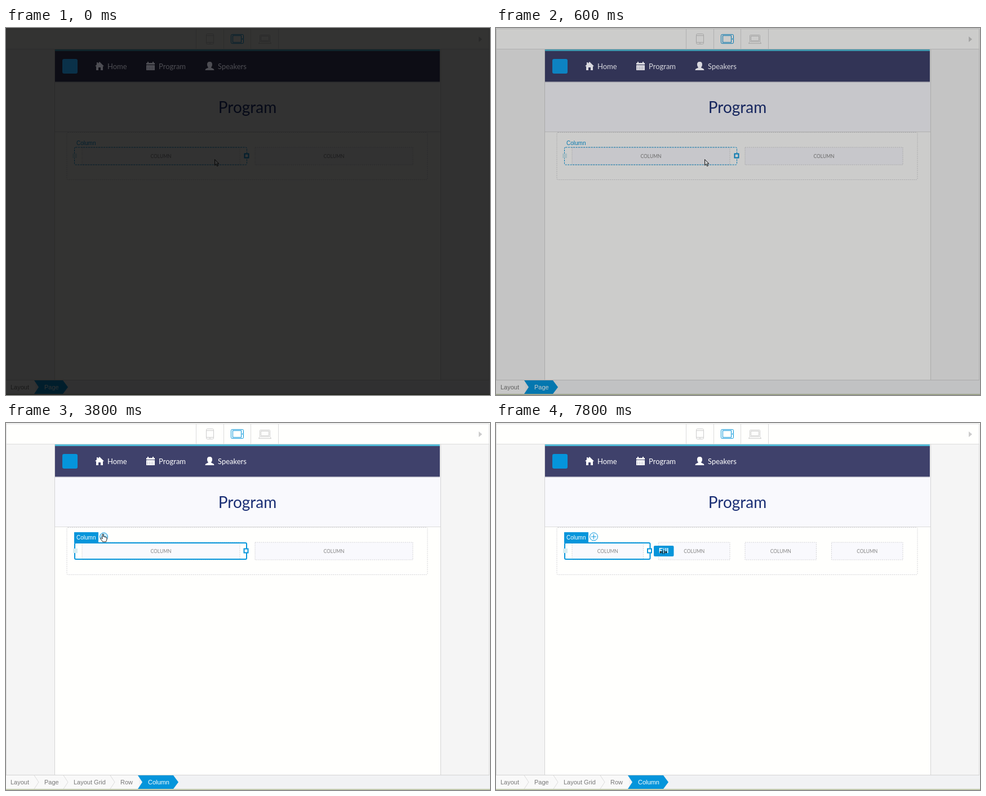
An HTML page that plays this animation: 859 px wide and 652 px high, repeating every 8 s.

```html
<!DOCTYPE html>
<html lang="en">
<head>
<meta charset="utf-8">
<title>Layout grid editor</title>
<style>
html, body { margin: 0; width: 100%; height: 100%; overflow: hidden; background: #fff; }
svg { display: block; width: 100%; height: 100%; }
text { font: 11px "Liberation Sans", Arial, sans-serif; fill: #777; }
.lato text, text.lato { font-family: Lato, sans-serif; }
.nav text { font-size: 13px; }
.line { fill: none; stroke: #dcdcdc; }
.dash { stroke: #d2d2d6; stroke-dasharray: 2 1.5; }
.blue { fill: #0595db; }
.ring { fill: #fff; stroke: #0595db; stroke-width: 2; }
.white, .white text { fill: #fff; }
.cursor { fill: #fff; stroke: #222; stroke-linejoin: round; }
</style>
</head>
<body>
<svg viewBox="0 0 859 652">
  <!-- Editor chrome -->
  <rect width="859" height="652" fill="#f5f5f5"/>
  <rect width="859" height="37" fill="#fffffd"/>
  <path class="line" d="M0 1.5H858M0 37.5H858M.5 1V625M857.5 1V625M337.5 2V37M386.5 2V37M434.5 2V37M483.5 2V37"/>
  <g fill="none" stroke="#ccc">
    <rect x="355.5" y="10.5" width="13" height="18" rx="2"/>
    <path d="M355 13.5H369M355 25.5H369M361 27H363"/>
    <rect x="450.5" y="12.5" width="18" height="12" rx="1"/>
    <rect x="452.5" y="14.5" width="14" height="8"/>
    <path d="M450 24.5L448.5 27.5H470.5L469 24.5"/>
  </g>
  <g fill="none" stroke="#0595db">
    <rect x="399.5" y="11.5" width="22" height="16" rx="2"/>
    <rect x="402.5" y="13.5" width="15" height="12"/>
    <path d="M419.5 18V21"/>
  </g>
  <path d="M839 15V25L845 20Z" fill="#ccc"/>

  <!-- Page -->
  <rect x="87" y="38" width="684" height="587" fill="#fffffd"/>
  <path d="M86.5 38V625M771.5 38V625" stroke="#d4d4d4"/>
  <rect x="87" y="38" width="683" height="3" fill="#50bbd8"/>
  <rect x="87" y="96" width="684" height="88" fill="#f9f9fd"/>
  <path d="M87 96.5H770" stroke="#dcdce4"/>
  <rect x="87" y="41" width="683" height="54.5" fill="#3f416b"/>
  <path class="line" d="M87 184.5H771"/>
  <text class="lato" x="428.5" y="151" text-anchor="middle" style="font-size:28px;fill:#1b2f75">Program</text>
  <rect class="line dash" x="108" y="185.5" width="640" height="84" rx="2"/>
  <g id="columns" class="lato"></g>
  <g id="selection"></g>

  <!-- Breadcrumb -->
  <rect y="625" width="859" height="26" fill="#f1f2f4"/>
  <path d="M0 625.5H858" stroke="#d4d4d4"/>
  <rect y="650" width="859" height="2" fill="#c3cbae"/>
  <g id="crumbs"></g>

  <g id="pointer">
    <path id="arrow" class="cursor" d="M.5.5V11L3 8.7L4.7 12.5L6.5 11.7L4.8 8H8Z"/>
    <path id="hand" class="cursor" d="M-1 1Q0-.5 1 1V5Q2 4 3 5.5Q4 4.7 5 6Q6.5 5.5 7 7V10Q6 12 5.5 14H-.5Q-2 11-4.5 8.5Q-4.5 6.5-2.5 7.5L-1 9Z"/>
    <g id="resize" fill="#222">
      <path d="M-1.5-3V4M1.5-3V4M-6 .5H-2M2 .5H6" stroke="#222"/>
      <path d="M-7 .5L-4-2V3ZM7 .5L4-2V3Z"/>
    </g>
  </g>

  <rect id="dim" width="859" height="652"/>

  <!-- Navigation and active tab stay slightly brighter during the fade -->
  <g id="vivid">
    <rect class="blue" x="100" y="55" width="27" height="26" rx="3"/>
    <g class="white lato nav">
      <path d="M166 60L174 68H172V75H168V70H164V75H160V68H158L161 65V61H163V63Z"/>
      <path d="M249 62H251V60H253V62H260V60H262V62H264V65H249ZM249 66H264V75H249Z"/>
      <path d="M251 69.5H263M251 72.5H263" stroke="#3f416b" stroke-dasharray="1 2"/>
      <path d="M361.5 60C365 60 366 62 366 65C366 67 365 69 364 70C365 72 369 71 369.5 75H353.5C354 71 358 72 359 70C358 69 357 67 357 65C357 62 358 60 361.5 60Z"/>
      <text x="180" y="73">Home</text>
      <text x="271" y="73">Program</text>
      <text x="376" y="73">Speakers</text>
    </g>
  </g>
</svg>
<script>
const LOOP = 8000, STEP = 200;
const SELECT = 1800, THIRD_COLUMN = 4200, FOURTH_COLUMN = 4800, DRAG = 7400;
const ROW_LEFT = 121, ROW_WIDTH = 614;
// Pointer stops: time, x, y
const STOPS = [[0, 370, 233], [1200, 370, 233], [1800, 385, 235], [2400, 385, 235],
  [3600, 172, 197], [4800, 172, 197], [5800, 172, 202], [6200, 172, 202],
  [7200, 272, 227], [7800, 297, 229]];

const el = id => document.getElementById(id);
const show = (id, on) => el(id).setAttribute("display", on ? "inline" : "none");

function pointerAt(t) {
  const i = STOPS.findIndex(s => s[0] > t);
  if (i < 0) return STOPS[STOPS.length - 1].slice(1);
  const [t0, x0, y0] = STOPS[i - 1], [t1, x1, y1] = STOPS[i];
  const p = (t - t0) / (t1 - t0), e = p * p * (3 - 2 * p);
  return [x0 + (x1 - x0) * e, y0 + (y1 - y0) * e];
}

function columns(count) {
  const width = ROW_WIDTH / count;
  return Array.from({ length: count }, (_, i) => {
    const x = ROW_LEFT + i * width + 14;
    return `<rect class="dash" fill="#f9f9fd" x="${x}" y="212" width="${width - 27}" height="31"/>
      <text x="${x + (width - 27) / 2}" y="230.5" text-anchor="middle"
        style="font-size:8.5px;fill:#858585">COLUMN</text>`;
  }).join("");
}

const handle = x => `<rect class="ring" x="${x - 3.5}" y="223.5" width="7" height="7"/>`;
const faintHandle = x => `<rect x="${x - 4}" y="223" width="8" height="8" fill="#d5edf3"/>`;

function selection(count, selected, hover, drag) {
  const width = ROW_WIDTH / count, right = ROW_LEFT + width;
  const label = (y, color) => `<text x="125" y="${y}" style="font-size:10px;fill:${color}">Column</text>`;
  if (!selected) return `<rect x="121.5" y="212" width="${width - 1}" height="31" rx="2"
      fill="none" stroke="#0595db" stroke-dasharray="3 1.5"/>` +
    label(208, "#0595db") + faintHandle(122) + handle(right - 1);
  return `<rect x="122" y="213" width="${width - 2}" height="29" rx="2" fill="none" stroke="#0595db" stroke-width="2"/>
    <rect class="blue" x="121" y="194" width="43" height="19"/>${label(207, "#fff")}
    <circle cx="173.5" cy="202" r="7" fill="${hover ? "#cfeaf6" : "#fff"}" stroke="#0595db"/>
    <path d="M169 202H178M173.5 197.5V206.5" stroke="#0595db"/>
    ${faintHandle(123)}${handle(right - 2)}` +
    (drag ? `<rect class="blue" x="280" y="218" width="35.5" height="19" rx="2"/>
      <text x="289" y="231" style="font-size:12px;font-weight:bold;fill:#fff">Fill</text>` : "");
}

const activeTab = (left, right, textX, name) =>
  `<path class="blue" d="M${left} 626H${right - 9}L${right} 638L${right - 9} 650H${left}L${left + 8} 638Z"/>
   <text class="white" x="${textX}" y="642">${name}</text>`;

function crumbs(selected) {
  const items = selected ? [["Layout", 8], ["Page", 68], ["Layout Grid", 120], ["Row", 203]] : [["Layout", 8]];
  const marks = selected ? [50, 102, 185] : [];
  return `<path d="M0 626H${selected ? 236 : 52}V650H0Z" fill="#f9f9f9"/>` +
    items.map(([name, x]) => `<text x="${x}" y="642">${name}</text>`).join("") +
    marks.map(x => `<path class="line" d="M${x} 626L${x + 8} 638L${x} 650"/>`).join("") +
    (selected ? activeTab(234, 306, 252, "Column") : activeTab(50, 110, 68, "Page"));
}

function draw(t) {
  const selected = t >= SELECT, resizing = t >= 7200;
  const count = t < THIRD_COLUMN ? 2 : t < FOURTH_COLUMN ? 3 : 4;
  const [x, y] = pointerAt(t);
  const hover = selected && Math.hypot(x - 173.5, y - 202) < 8;
  const dark = Math.max(0, 0.8 - t / 1000);
  el("dim").setAttribute("opacity", dark);
  el("vivid").setAttribute("opacity", 1 - 0.92 * dark);
  el("columns").innerHTML = columns(count);
  el("selection").innerHTML = selection(count, selected, hover, t >= DRAG);
  el("crumbs").innerHTML = crumbs(selected);
  show("arrow", !hover && !resizing);
  show("hand", hover);
  show("resize", resizing);
  el("pointer").setAttribute("transform", `translate(${x} ${y})`);
}

let drawn = -1;
function frame(now) {
  const t = Math.floor(now % LOOP / STEP) * STEP;
  if (t !== drawn) draw(drawn = t);
  requestAnimationFrame(frame);
}
requestAnimationFrame(frame);
</script>
</body>
</html>
```
